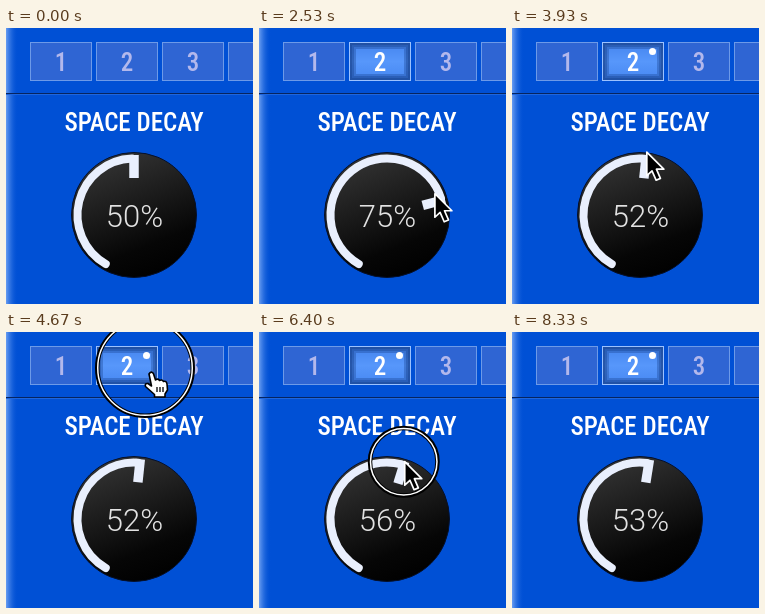
An HTML page that plays this animation: 247 by 276 pixels, repeating every 8.36 s.

```html
<!DOCTYPE html>
<html lang="en">
<head>
<meta charset="utf-8">
<title>Space decay knob</title>
<style>
  html, body { margin: 0; width: 100%; height: 100%; overflow: hidden; background: #0050d5; }
  svg { display: block; width: 247px; height: 276px; }
  text { font-family: "Roboto Condensed", Roboto, "Liberation Sans", sans-serif; font-stretch: 75%; text-anchor: middle; }
  .tab rect { fill: #2f65d3; stroke: #6d9ae8; }
  .tab text { font-size: 25px; font-weight: 500; fill: #b3b8ec; }
  .tab.on rect { fill: url(#lit); stroke: #9cc2ff; }
  .tab.on text { fill: #fff; }
  .shade { display: none; fill: none; stroke: #10357f; stroke-opacity: .3; }
  .tab.on .shade { display: inline; }
  #title { font-size: 25px; font-weight: 450; fill: #fff; }
  #label { font-family: Roboto, "Liberation Sans", sans-serif; font-stretch: 100%; font-size: 31px; font-weight: 300; fill: #e2e2e2; }
  #arc, #tick { fill: none; stroke: #e9effd; }
</style>
</head>
<body>
<svg viewBox="0 0 247 276">
  <defs>
    <linearGradient id="edge">
      <stop offset="0" stop-color="#6a9ef2"/>
      <stop offset="1" stop-color="#0050d5" stop-opacity="0"/>
    </linearGradient>
    <linearGradient id="lit" x2="0" y2="1">
      <stop offset="0" stop-color="#4484ee"/>
      <stop offset=".5" stop-color="#5797fb"/>
      <stop offset="1" stop-color="#4687f2"/>
    </linearGradient>
    <linearGradient id="metal" x1=".3" x2=".7" y2="1">
      <stop offset="0" stop-color="#353535"/>
      <stop offset=".75" stop-color="#060606"/>
      <stop offset="1" stop-color="#000"/>
    </linearGradient>
  </defs>
  <rect width="247" height="276" fill="#0050d5"/>
  <rect width="12" height="276" fill="url(#edge)"/>
  <rect y="65" width="247" height="1" fill="#06245f"/>
  <rect y="66" width="247" height="1" fill="#1f66dd"/>
  <g id="tabs"></g>
  <circle id="dot" cx="140.5" cy="23.5" r="3.5" fill="#fff"/>
  <text id="title" x="128" y="103">SPACE DECAY</text>
  <circle cx="128" cy="187" r="62.5" fill="url(#metal)" stroke="#04102c"/>
  <path id="arc" stroke-width="8" stroke-linecap="round"/>
  <path id="tick" d="M128 127V150" stroke-width="9.5"/>
  <text id="label" x="128.5" y="199">50%</text>
  <g fill="none">
    <circle class="ring" stroke="#000" stroke-width="4.5"/>
    <circle class="ring" stroke="#fff" stroke-width="1.5"/>
  </g>
  <path id="arrow" d="M0 0V23.5L5.2 18.6L9.3 28L13.6 26.2L9.6 17H17Z" fill="#000" stroke="#fff" stroke-width="1.7" stroke-linejoin="round"/>
  <g id="hand" stroke="#000" stroke-width="1.6" stroke-linejoin="round">
    <path d="M-2 2Q0-1.5 2.4 1.5L4.5 8Q7 6 8.5 8.5Q11 7 12.5 9.5Q15.5 8.5 16 12L16.5 18L14 22V25H3.5V22.5L-5.5 14.5Q-6.5 11 -3 11.5L.5 14Z" fill="#fff"/>
    <path d="M6 15V20M9 15V20M12 15V20" stroke-width="1.3"/>
  </g>
</svg>
<script>
const LOOP = 8360, CX = 128, CY = 187, R = 56.5;
const ENTER = 300, ARRIVE = 1000, LEAVE = 7080, GONE = 7200;
const START = 50, PRESET = 75;
const $ = id => document.getElementById(id);

// Each round: click the tab to recall the preset, walk to the knob, drag it down.
const rounds = [
  { tab: [123, 45], click: 1270, lift: 1500, walk: 1900, grab: 2700, drag: 2970, drop: 3530, end: 52, reach: 50 },
  { tab: [145, 40], click: 4670, lift: 4830, walk: 5300, grab: 5970, drag: 6100, drop: 6900, end: 53, reach: 61 }
];

const span = (t, a, b) => Math.min(1, Math.max(0, (t - a) / (b - a)));
const mix = (a, b, k) => a + (b - a) * k;
const mixPoint = (p, q, k) => p.map((v, i) => mix(v, q[i], k));
const smooth = k => k * k * (3 - 2 * k);
const settle = k => k < 1 ? 1 - 2 ** (-8 * k) : 1;
const within = (t, a, b) => t >= a && t < b;
const turn = v => v * 3 - 150;
const polar = (deg, r = R) => {
  const a = deg * Math.PI / 180;
  return [CX + r * Math.sin(a), CY - r * Math.cos(a)];
};

function valueAt(t) {
  return rounds.reduce((v, r) => {
    v = mix(v, PRESET, span(t, r.lift + 70, r.lift + 170));
    return mix(v, r.end, settle(span(t, r.drag, r.drop)));
  }, START);
}

// While dragging, the pointer follows the tip of the arc.
function pointerAt(t) {
  const [first, second] = rounds;
  const k = span(t, ENTER, ARRIVE);
  if (k < 1) {
    const [x, y] = mixPoint([-20, 92], first.tab, smooth(k));
    return [x + 100 * Math.sin(Math.PI * k), y];
  }
  const r = t < 3770 ? first : second;
  const pull = settle(span(t, r.drag, r.drop));
  const grip = polar(turn(mix(PRESET, r.end, pull)), mix(53, r.reach, pull));
  if (r === second && t < r.walk) {
    const from = polar(turn(first.end), first.reach);
    return mixPoint(from, r.tab, smooth(span(t, 3770, 4470)));
  }
  const onKnob = mixPoint(r.tab, grip, smooth(span(t, r.walk, r.grab - 60)));
  return mixPoint(onKnob, [248, 104], span(t, LEAVE, GONE));
}

function ringAt(t) {
  for (const r of rounds) {
    if (within(t, r.click, r.lift)) return { size: 50, dx: -6, dy: -4 };
    if (within(t, r.grab, r.drop)) return { size: 36, dx: -1, dy: 0 };
  }
}

const show = (el, on) => el.setAttribute("visibility", on ? "visible" : "hidden");

$("tabs").innerHTML = [1, 2, 3, ""].map((n, i) => {
  const x = 24 + 66 * i;
  const shades = [2, 4, 6].map(w =>
    `<path class="shade" d="M${x + 1 + w / 2} ${15 + w / 2}h${60 - w}v${37 - w}h${w - 60}z" stroke-width="${w}"/>`);
  return `<g class="tab"><rect x="${x + .5}" y="14.5" width="61" height="38"/>
    ${shades.join("")}<text x="${x + 31}" y="43">${n}</text></g>`;
}).join("");
const tab = $("tabs").children[1];
const ringLines = [...document.querySelectorAll(".ring")];

function draw(t) {
  const v = valueAt(t), angle = turn(v);
  $("arc").setAttribute("d", `M${polar(-150)}A${R} ${R} 0 ${v > 60 ? 1 : 0} 1 ${polar(angle - 2)}`);
  $("tick").setAttribute("transform", `rotate(${angle} ${CX} ${CY})`);
  $("label").textContent = Math.round(v) + "%";

  const [x, y] = pointerAt(t);
  const visible = within(t, ENTER, GONE);
  const overTab = y > 13 && y < 54;
  for (const [id, on] of [["arrow", !overTab], ["hand", overTab]]) {
    $(id).setAttribute("transform", `translate(${x} ${y})`);
    show($(id), visible && on);
  }

  const ring = ringAt(t);
  ringLines.forEach((c, i) => {
    show(c, ring);
    if (!ring) return;
    c.setAttribute("cx", x + ring.dx);
    c.setAttribute("cy", y + ring.dy);
    c.setAttribute("r", ring.size - 2.25 - i * .5);
  });
  tab.classList.toggle("on", t >= ARRIVE - 60);
  const [first, second] = rounds;
  show($("dot"), within(t, first.drag, second.lift) || t >= second.drag);
}

const start = performance.now();
function frame() {
  draw((performance.now() - start) % LOOP);
  requestAnimationFrame(frame);
}
draw(0);
requestAnimationFrame(frame);
</script>
</body>
</html>
```
